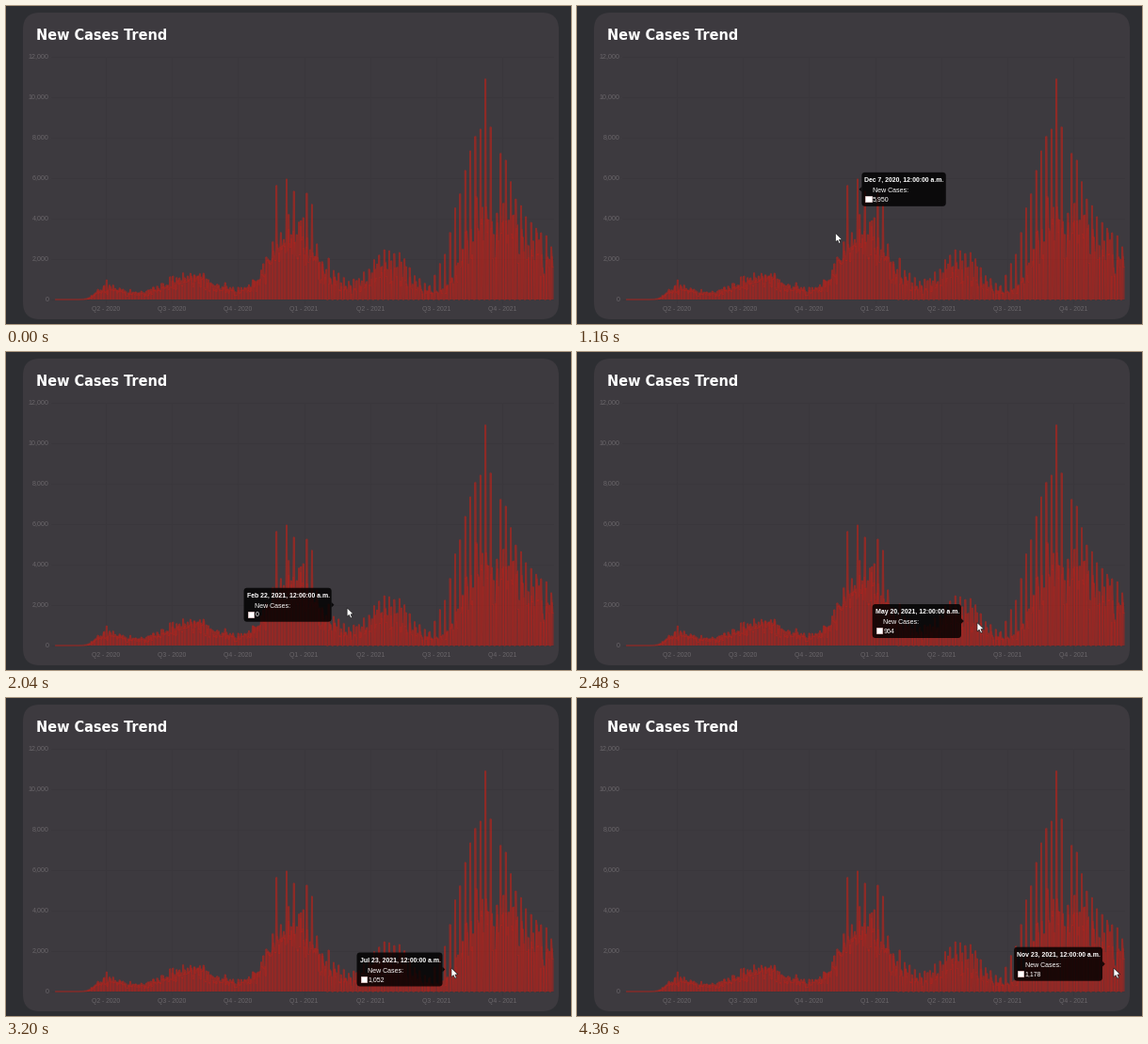
Recreate the animation shown at these times as a matplotlib script. Size 600x338 px, loop 4.4 s.

```python
import numpy as np
import matplotlib.pyplot as plt
from matplotlib.animation import FuncAnimation
from matplotlib.patches import FancyBboxPatch, Polygon, Rectangle

W, H, DPI = 600, 338, 100
STEP, LOOP = 40, 4400
PX = 72 / DPI
LEFT, DAY_W = 53, 0.768   # x of the first day, pixels per day
BASE_Y = 312              # y of zero cases
ROW = 43                  # pixels per 2,000 cases
RED = "#cc1f16"

plt.rcParams["path.simplify"] = False
plt.rcParams["toolbar"] = "None"
fig = plt.figure(figsize=(W / DPI, H / DPI), dpi=DPI, facecolor="#2d2e32")
ax = fig.add_axes([0, 0, 1, 1])
ax.set_xlim(0, W)
ax.set_ylim(H, 0)
ax.axis("off")


def label(x, y, s, size, color="white", font="Liberation Sans", **kw):
    return ax.text(x, y, s, fontsize=size * PX, color=color, family=font, **kw)


def rounded(x, y, w, h, r, color, **kw):
    style = f"round,pad=0,rounding_size={r}"
    box = FancyBboxPatch((x, y), w, h, boxstyle=style, fc=color, ec="none", **kw)
    return ax.add_patch(box)


# Card, grid and axis labels
rounded(18, 7, 569, 326, 18, "#3d3a3f")
label(32, 35.5, "New Cases Trend", 14.5, font="DejaVu Sans", weight="bold")

GRID, AXIS = "#3a373c", "#696569"
for k in range(7):
    y = BASE_Y - ROW * k
    ax.plot([48, 581], [y, y], color=GRID, lw=PX, zorder=1)
    label(46, y, f"{2000 * k:,}", 7.2, AXIS, ha="right", va="center")
    x = 106 + 70.2 * k
    ax.plot([x, x], [54, 316], color=GRID, lw=PX, zorder=1)
    label(x, 322, f"Q{(k + 1) % 4 + 1} - {2020 + (k + 1) // 4}", 6.9, AXIS,
          ha="center", va="center")

# Pointer and tooltip: (ms, pointer x, y, tooltip anchor x, y, day, cases)
STOPS = [(560, 499, 83, 354, 118, 305, 5633),
         (760, 243, 149.5, 320.5, 163, 305, 5633),
         (1120, 272, 240, 300, 190, 319, 5950),
         (1640, 305, 257.5, 292, 253, 316, 2633),
         (2480, 425, 287.5, 411, 286, 483, 964),
         (2840, 450, 290, 440, 295, 516, 640),
         (3200, 473, 287, 466.5, 288.5, 547, 1052),
         (3720, 526, 283, 510.5, 271, 608, 2102),
         (4360, 570, 287, 561, 282.7, 670, 1178)]
TIMES, *TRACKS, STOP_CASES = zip(*STOPS)
FADE_MS, FLIP_MS = (600, 780), (1800, 1960)


def wave(x, mid, rise, fall, height):
    spread = np.where(x < mid, rise, fall)
    return height * np.exp(-((x - mid) / spread) ** 2 / 2)


# Daily cases: waves, noise, and weekly reporting gaps with catch-up peaks
rng = np.random.default_rng(7)
days = np.arange(688)
xs = LEFT + DAY_W * days
level = (250 / (1 + np.exp((92 - xs) / 3))
         + wave(xs, 107, 8, 14, 300) + wave(xs, 192, 22, 30, 750)
         + wave(xs, 302, 20, 27, 2800) + wave(xs, 407, 20, 20, 1250)
         + wave(xs, 503, 17, 58, 3400))
cases = level * np.clip(1 + 0.25 * rng.standard_normal(days.size), 0.5, 1.5)
week = (days - 69) % 7
late = xs > 340
cases[late & (week >= 5)] = 0
peaks = np.maximum(1.65 * level, wave(xs, 508, 26, 32, 8700))
peaks *= rng.uniform(0.93, 1.07, days.size)
cases[late & (week == 0)] = peaks[late & (week == 0)]
for day, n in [(70, 960), (329, 5350), (347, 5250), (354, 4700), (594, 10900)]:
    cases[day] = n
cases[list(TRACKS[4])] = STOP_CASES

ys = BASE_Y - cases * ROW / 2000
ax.vlines(xs, ys, BASE_Y, color=RED, alpha=0.27, lw=2 * PX, zorder=2)
ax.plot(xs, ys, color=RED, alpha=0.42, lw=1.8 * PX, zorder=3,
        solid_joinstyle="round")

# Tooltip
TIP_H = 36
tip = rounded(0, 0, 92, TIP_H, 3.5, "black", zorder=5)
caret = ax.add_patch(Polygon(np.zeros((3, 2)), fc="black", ec="none", zorder=5))
swatch = ax.add_patch(Rectangle((0, 0), 6.2, 6.2, fc="white", ec="#f3d6d6",
                                lw=0.7 * PX, zorder=6))
head = label(0, 0, "", 6.85, weight="bold", zorder=6)
series = label(0, 0, "New Cases:", 6.95, zorder=6)
count = label(0, 0, "", 6.95, zorder=6)
shade, ink = [tip, caret], [swatch, head, series, count]

ARROW = np.array([(0, 0), (0, 9.6), (2.2, 7.6), (3.8, 11.1), (5.4, 10.4),
                  (3.9, 7), (6.9, 6.8)])
mouse = ax.add_patch(Polygon(ARROW, fc="white", ec="#1b1a1c", lw=0.6 * PX, zorder=8))


def progress(t, span):
    return np.clip((t - span[0]) / (span[1] - span[0]), 0, 1)


def draw_tip(t, x, mid, day):
    alpha = progress(t, FADE_MS)
    for part in shade:
        part.set_alpha(0.82 * alpha)
    for part in ink:
        part.set_alpha(alpha)

    date = (np.datetime64("2020-01-23") + day).astype(object)
    head.set_text(f"{date:%b} {date.day}, {date.year}, 12:00:00 a.m.")
    count.set_text(f"{cases[day]:,.0f}")

    # The box hangs right of its anchor, then slides over to the left side
    width = head.get_window_extent().width + 5
    flip = progress(t, FLIP_MS)
    left = x + 3 - (width + 6) * flip * flip * (3 - 2 * flip)
    top = mid - TIP_H / 2
    tip.set_bounds(left, top, width, TIP_H)
    side, edge = (-1, left) if flip < 0.5 else (1, left + width)
    caret.set_xy([(edge, mid - 2.8), (edge + 2.8 * side, mid), (edge, mid + 2.8)])
    swatch.set_xy((left + 4, top + 25))
    head.set_position((left + 3, top + 9.9))
    series.set_position((left + 11.8, top + 21.2))
    count.set_position((left + 11.8, top + 30.7))


def draw(i):
    t = i * STEP
    mx, my, x, y, day = (np.interp(t, TIMES, track) for track in TRACKS)
    for part in [*shade, *ink, mouse]:
        part.set_visible(t >= TIMES[0])
    draw_tip(t, x, y, int(round(day)))
    mouse.set_xy(ARROW + (mx, my))
    return [*shade, *ink, mouse]


anim = FuncAnimation(fig, draw, frames=LOOP // STEP, interval=STEP,
                     repeat=True, repeat_delay=0, blit=False)
plt.show()
```
